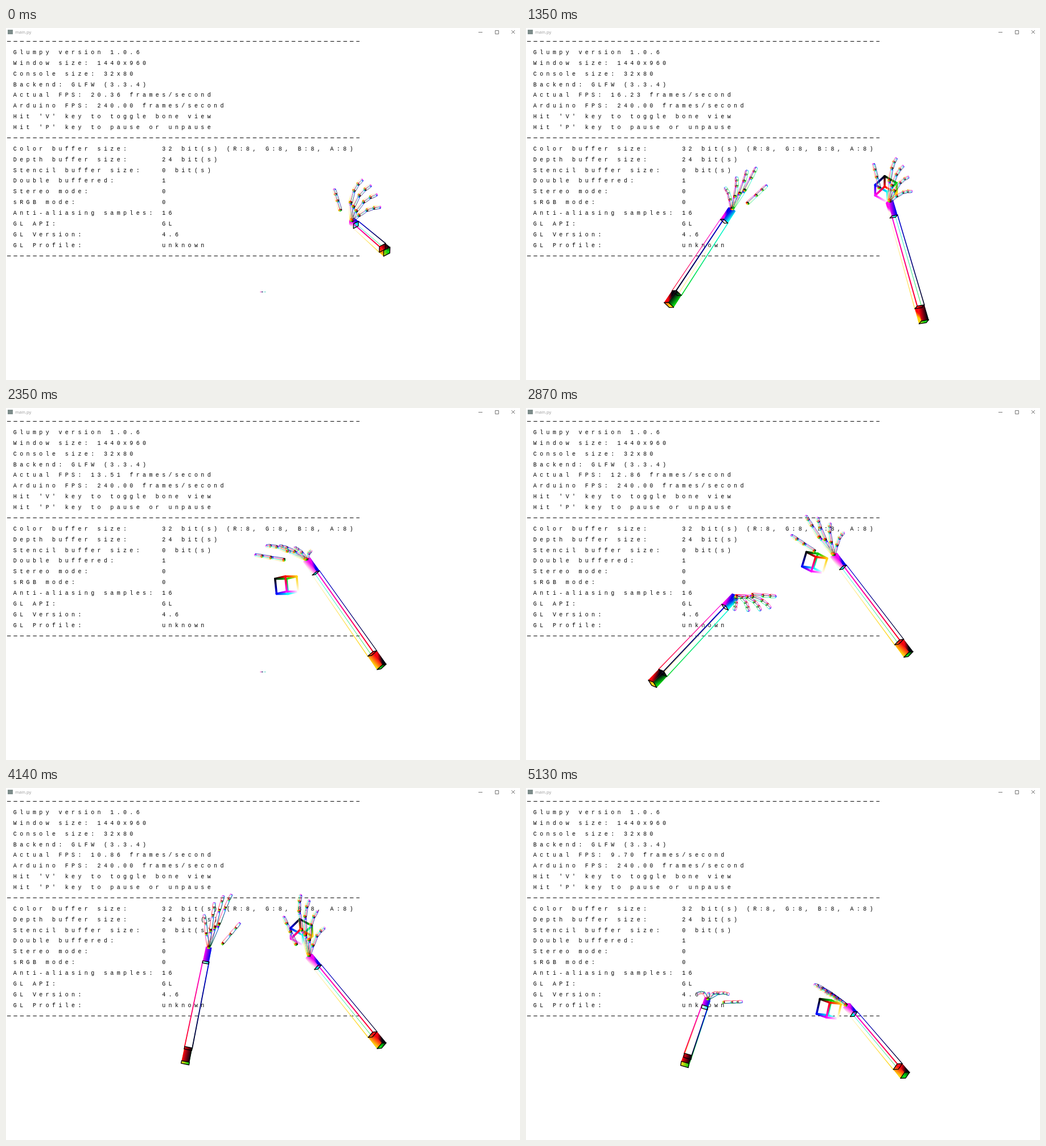
These frames come from a looping animation (903x620 px, 5270 ms). An HTML page with a canvas:

```html
<!DOCTYPE html>
<html lang="en">
<head>
<meta charset="utf-8">
<title>main.py</title>
<style>
html, body { margin: 0; width: 100%; height: 100%; overflow: hidden; background: #fff; }
canvas { position: absolute; left: 0; top: 0; }
pre { position: absolute; left: 1.5px; top: 16px; margin: 0; color: #000;
  font: 10px/18.87px "Liberation Mono", monospace; letter-spacing: 5.36px; }
#title { position: absolute; left: 16px; top: 1px; color: #999; font: 7.6px/12px "Open Sans", sans-serif; }
</style>
</head>
<body>
<div id="title">main.py</div>
<pre>

 Glumpy version 1.0.6
 Window size: 1440x960
 Console size: 32x80
 Backend: GLFW (3.3.4)
 Actual FPS: <span id="fps">20.36</span> frames/second
 Arduino FPS: 240.00 frames/second
 Hit 'V' key to toggle bone view
 Hit 'P' key to pause or unpause

 Color buffer size:     32 bit(s) (R:8, G:8, B:8, A:8)
 Depth buffer size:     24 bit(s)
 Stencil buffer size:   0 bit(s)
 Double buffered:       1
 Stereo mode:           0
 sRGB mode:             0
 Anti-aliasing samples: 16
 GL API:                GL
 GL Version:            4.6
 GL Profile:            unknown
</pre>
<canvas id="stage" width="903" height="620"></canvas>
<script>
const ctx = document.getElementById('stage').getContext('2d');
const fps = document.getElementById('fps');
const LOOP = 5270, QUARTER = Math.PI / 2, DEGREE = Math.PI / 180;

// Key moments: start, picture changes until the next one, frame rate
const KEYS = [[0, 7, 20.36], [810, 7, 17.43], [1810, 5, 14.62], [2350, 8, 13.51],
  [3270, 6, 12.2], [4140, 9, 10.86], [5130, 1, 9.7]];

// One pose per key: elbow, wrist, arm roll, wrist to fingertips, half the spread towards the thumb.
// The right hand adds the centre and turn of its cube.
const RIGHT = [
  [669, 394, 607, 340, 10, 37, -52, -16, -24, 590, 320, 0],
  [643, 505, 570, 288, 17, 28, -41, -19, -26, 555, 280, 0],
  [631, 496, 587, 291, 28, 26, -63, -7, -33, 593, 251, 0],
  [660, 456, 528, 267, -17, -33, -21, -40, -4, 493, 312, -103],
  [684, 412, 553, 251, -17, 0, -95, -27, -25, 521, 232, -22],
  [660, 454, 532, 296, -17, 7, -84, -21, -29, 519, 254, -3],
  [666, 506, 563, 383, -14, -41, -25, -18, -13, 532, 389, -70],
];
const LEFT = [
  null,
  [308, 526, 349, 291, 107, 14, -75, 21, -28],
  [175, 437, 379, 357, 112, 19, -38, 36, -4],
  null,
  [238, 502, 364, 323, 90, 36, 45, 30, -1],
  [315, 484, 356, 282, 45, 17, -81, 24, -18],
  [279, 487, 319, 372, 50, 11, -10, 27, 1],
];

const mix = (a, b, u) => a + (b - a) * u;
const mixAll = (a, b, u) => a.map((v, i) => mix(v, b[i], u));
const add = (point, ...terms) => terms.reduce(([x, y], [k, [vx, vy]]) => [x + k * vx, y + k * vy], point);
const rgb = (r, g, b) => `rgb(${[r, g * mix(.82, 1, b), b].map(v => Math.round(v * 255))})`;

LEFT[0] = mixAll(LEFT[6], LEFT[1], .5);
LEFT[3] = mixAll(LEFT[2], LEFT[4], .5);

function gradient(a, b, from, to) {
  const g = ctx.createLinearGradient(...a, ...b);
  g.addColorStop(0, from);
  g.addColorStop(1, to);
  return g;
}

function path(...points) {
  ctx.beginPath();
  points.forEach(p => ctx.lineTo(...p));
}

function bar(a, b, from, to, width) {
  ctx.strokeStyle = gradient(a, b, from, to);
  ctx.lineWidth = width;
  path(a, b);
  ctx.stroke();
}

// A hollow colour cube, stretched from a to b; blue runs along it
function bone(a, b, widthA, widthB, roll, tilt) {
  const dx = b[0] - a[0], dy = b[1] - a[1], length = Math.hypot(dx, dy) || 1;
  const ux = dx / length, uy = dy / length;
  const angle = k => roll * DEGREE + k * QUARTER;
  const corner = (k, s) => {
    const [x, y] = mixAll(a, b, s), w = mix(widthA, widthB, s);
    const side = w * Math.cos(angle(k)), along = w * tilt * Math.sin(angle(k));
    return [x - uy * side + ux * along, y + ux * side + uy * along];
  };
  const color = (k, s) => rgb(k % 4 === 1 || k % 4 === 2 ? 1 : 0, k % 4 > 1 ? 1 : 0, s);
  const depth = k => Math.sin(angle(k + .5));

  for (const k of [0, 1, 2, 3].sort((m, n) => depth(m) - depth(n))) {
    const thickness = mix(.08, .2, (Math.sin(angle(k)) + 1) / 2);
    bar(corner(k, .12), corner(k, .88), color(k, .12), color(k, .88), Math.max(.7, widthA * thickness));
    for (const s of [0, .875]) {
      const e = s + .125, m = s + .06;
      ctx.fillStyle = gradient(corner(k, m), corner(k + 1, m), color(k, m), color(k + 1, m));
      path(corner(k, s), corner(k + 1, s), corner(k + 1, e), corner(k, e));
      ctx.fill();
    }
  }
  if (widthA < 5) return;
  ctx.strokeStyle = '#000';
  ctx.lineWidth = 1.3;
  for (const s of [0, .125, .875]) {
    path(...[0, 1, 2, 3].map(k => corner(k, s)));
    ctx.closePath();
    ctx.stroke();
  }
}

function finger(from, to, lean, roll) {
  const length = Math.hypot(to[0] - from[0], to[1] - from[1]);
  const control = add(mixAll(from, to, .5), [.2 * length, lean]);
  const joints = [0, .45, .75, 1].map(u => mixAll(mixAll(from, control, u), mixAll(control, to, u), u));
  for (let j = 0; j < 3; j++) bone(joints[j], joints[j + 1], 3.3, 2.9, roll, .5);
}

function drawHand([ex, ey, wx, wy, roll, fx, fy, sx, sy]) {
  const wrist = [wx, wy], reach = [fx, fy], spread = [sx, sy];
  const length = Math.hypot(wx - ex, wy - ey);
  const arm = [(wx - ex) / length, (wy - ey) / length];
  const tilt = .6 * Math.sqrt(Math.max(0, 1 - (length / 250) ** 2));
  bone([ex, ey], wrist, 10, 7.5, roll, tilt);

  const palm = add([0, 0], [8, arm], [.3, reach]);
  const thumb = add(wrist, [1.1, spread], [-.4, palm]);
  finger(thumb, add(thumb, [1.15, spread], [.2, reach]), [0, 0], roll);
  for (let f = 0; f < 4; f++) {
    const side = 1 - f / 1.5;
    const knuckle = add(wrist, [1, palm], [.45 * side, spread]);
    const tip = add(wrist, [1.07 - .13 * side * side, reach], [side, spread]);
    bone(wrist, knuckle, 3, 3, roll, .5);
    finger(knuckle, tip, arm, roll);
  }
}

function drawCube(x, y, turn) {
  const size = 27, yaw = (38 - .6 * turn) * DEGREE, pitch = 47 * DEGREE;
  const red = [0, Math.cos(pitch)];
  const green = [Math.cos(yaw), Math.sin(yaw) * Math.sin(pitch)];
  const blue = [-Math.sin(yaw), Math.cos(yaw) * Math.sin(pitch)];
  const corner = ([r, g, b]) =>
    add([0, 0], [(r - .5) * size, red], [(g - .5) * size, green], [(b - .5) * size, blue]);
  ctx.save();
  ctx.translate(x, y);
  ctx.rotate(turn * DEGREE);
  ctx.lineCap = 'round';
  for (let n = 0; n < 8; n++) {
    const from = [n >> 2, n >> 1 & 1, n & 1];
    from.forEach((bit, i) => {
      if (bit) return;
      const to = from.with(i, 1);
      bar(corner(from), corner(to), rgb(...from), rgb(...to), 3.6);
    });
  }
  ctx.restore();
}

function drawWindow() {
  ctx.fillStyle = '#7d8c8a';
  ctx.fillRect(3, 3, 9, 8);
  ctx.strokeStyle = '#777';
  ctx.lineWidth = 1;
  ctx.strokeRect(859.5, 4.5, 6, 6);
  for (const line of [[[830, 7.5], [837, 7.5]], [[888, 4], [894, 10]], [[888, 10], [894, 4]]]) {
    path(...line);
    ctx.stroke();
  }
  ctx.strokeStyle = '#000';
  ctx.setLineDash([6.4, 4.96]);
  for (const y of [23.5, 193.5, 401.5]) {
    path([2, y], [621, y]);
    ctx.stroke();
  }
  ctx.setLineDash([]);
}

// The right arm swings out and back on some of the ways between keys: x, y, easing power
const SWINGS = { 0: [112, 40, .8], 1: [112, 30, 2], 5: [0, 55, 3] };

function frame() {
  const t = performance.now() % LOOP;
  const i = KEYS.findLastIndex(k => k[0] <= t), next = (i + 1) % KEYS.length;
  const [start, steps, rate] = KEYS[i];
  const u = Math.floor((t - start) / ((KEYS[next][0] || LOOP) - start) * steps) / steps;
  const phase = i + u;

  ctx.clearRect(0, 0, 903, 620);
  ctx.lineJoin = 'round';
  drawWindow();
  fps.textContent = mix(rate, KEYS[next][2], u).toFixed(2);

  if (phase < .28 || (phase > 2.35 && phase < 3.45)) {
    ['#f6c', '#226', '#aee', '#7dc'].forEach((c, n) => {
      ctx.fillStyle = c;
      ctx.fillRect(446.5 + n * 2.6, 464, 2, 1.6);
    });
  } else {
    drawHand(mixAll(LEFT[i], LEFT[next], u));
  }

  const pose = mixAll(RIGHT[i], RIGHT[next], u);
  const [dx, dy, power] = SWINGS[i] || [0, 0, 1];
  const swing = Math.sin(Math.PI * u ** power);
  ctx.save();
  ctx.translate(dx * swing, dy * swing);
  if (phase > .5) drawCube(...pose.slice(9));
  drawHand(pose);
  ctx.restore();
  requestAnimationFrame(frame);
}
frame();
</script>
</body>
</html>
```
